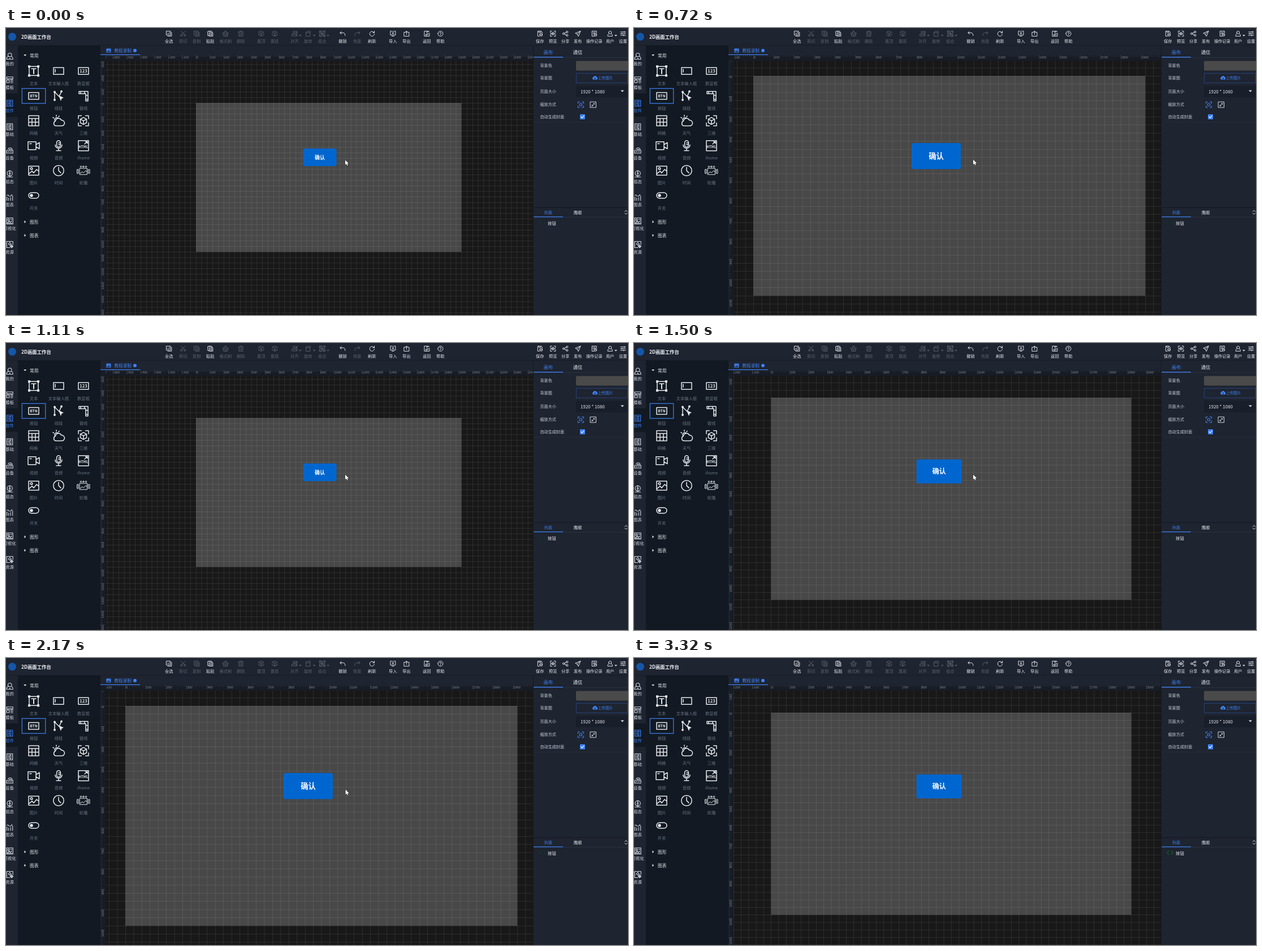
Recreate the animation shown at these times as an HTML page with a canvas. Size 1100 by 509 pixels, loop 3720 ms.

```html
<!DOCTYPE html>
<html lang="zh">
<head>
<meta charset="utf-8">
<title>2D画面工作台</title>
<style>
html, body { margin: 0; width: 100%; height: 100%; overflow: hidden; background: #1e2430; }
canvas { display: block; width: 1100px; height: 509px; }
</style>
</head>
<body>
<canvas id="stage" width="1100" height="509"></canvas>
<script>
const W = 1100, H = 509, LOOP = 3720;
const FONT = '"Noto Sans CJK SC", "Noto Sans CJK", "Noto Sans", sans-serif';
const RULE_FONT = '"Liberation Sans", sans-serif';
const BLUE = '#3f82f7', WHITE = '#e6eaf0', DIM = '#5b616c', BAR = '#1e2430', DARK = '#121922';
const view = document.getElementById('stage').getContext('2d');
const uiCanvas = document.createElement('canvas');
uiCanvas.width = W;
uiCanvas.height = H;
const ui = uiCanvas.getContext('2d');

// Path pieces
const O = (x, y, r) => `M${x - r} ${y}a${r} ${r} 0 1 0 ${2 * r} 0a${r} ${r} 0 1 0 ${-2 * r} 0z`;
const R = (x, y, w, h) => `M${x} ${y}h${w}v${h}h${-w}z`;
const CORNERS = s => [[-1, -1], [1, -1], [1, 1], [-1, 1]]
  .map(([a, b]) => `M${a * s} ${b * s * .4}V${b * s}H${a * s * .4}`).join('');

function box(g, x, y, w, h, color) {
  g.fillStyle = color;
  g.fillRect(x, y, w, h);
}

function text(g, s, x, y, size, color, align = 'center', weight = 400, family = FONT) {
  g.font = `${weight} ${size}px ${family}`;
  g.textAlign = align;
  g.textBaseline = 'middle';
  g.fillStyle = color;
  g.fillText(s, x, y);
}

function icon(x, y, line, color, width = 1, solid = '') {
  ui.save();
  ui.translate(x, y);
  ui.lineWidth = width;
  ui.lineJoin = ui.lineCap = 'round';
  ui.strokeStyle = ui.fillStyle = color;
  if (line) ui.stroke(new Path2D(line));
  if (solid) ui.fill(new Path2D(solid));
  ui.restore();
}

const caret = (x, y, color, s = 2.4) =>
  icon(x, y, '', color, 1, `M${-s} ${-s / 2}H${s}L0 ${s / 2}Z`);

function toolbar() {
  const stack = 'M0-4.5L4.5-2.5L0-.5L-4.5-2.5ZM-4.5 0V2.5L0 4.5L4.5 2.5V0';
  const sheet = 'M4-1V-4.5H-4V4.5H0M-2-2H2M-2 0H1';
  const tools = [
    [288, '全选', R(-4.5, -4.5, 7, 7) + 'M-2.5 4.5H4.5V-2.5M-3-1L-1.2.6L1.2-2.4', 1],
    [313, '剪切', 'M-4-4.5L3 2M4-4.5L-3 2' + O(-3, 3, 1.5) + O(3, 3, 1.5), 0],
    [337, '复制', R(-4.5, -4.5, 7, 7) + 'M-2.5 4.5H4.5V-2.5M-3-1H1M-1-3V1', 0],
    [361, '粘贴', 'M-2 3.5H-4.5V-4H3V-2M-2.5-4.5H1' + R(-1.5, -1.5, 6, 6) + 'M0 .8H3M0 2.6H3', 1],
    [388, '格式刷', 'M-1.2-1.5V-4.5H1.2V-1.5H4.5V1H-4.5V-1.5ZM-3.5 1V4.5H3.5V1M0 2V4.5', 0],
    [415, '删除', 'M-4.5-3H4.5M-1.5-4.6H1.5M-3.5-3V4.5H3.5V-3M-1.2-.8V2.5M1.2-.8V2.5', 0],
    [451, '置顶', stack + 'M0 3.5V0M-1.5 1.5L0 0L1.5 1.5', 0],
    [475, '置底', stack + 'M0 0V3.5M-1.5 2L0 3.5L1.5 2', 0],
    [510, '对齐', 'M4.5-4.5V4.5' + R(-2, -4, 5, 3) + R(-4.5, 1, 7.5, 3), 0, 520.5],
    [534, '旋转', R(-3.5, -1.5, 7, 6) + 'M-4.5-2A5 4 0 0 1 3-3.6L4.5-2M3-3.6L4-5', 0, 545],
    [559, '组合', R(-4, -4, 8, 8) + R(-2.2, -2.2, 3, 3) + R(-.5, -.5, 2.8, 2.8) + CORNERS(5), 0, 569.5],
    [595, '撤销', 'M-2-4L-4.5-1.5L-2 1M-4.5-1.5H1C3.5-1.5 4.5 1 4.5 3.5', 1],
    [621, '恢复', 'M2-4L4.5-1.5L2 1M4.5-1.5H-1C-3.5-1.5-4.5 1-4.5 3.5', 0],
    [647, '刷新', 'M3.7-1.8A4.2 4.2 0 1 0 4.2.8M4.2-4.5V-1.6H1.4', 1],
    [684, '导入', 'M-2-4.5H-4.5V2.5H4.5V-4.5H2M0-4.5V.5M-1.8-1.2L0 .6L1.8-1.2M-2 4.5H2', 1],
    [708, '导出', 'M-1.5-2.5H-4.5V4.5H4.5V-2.5H1.5M0 1.5V-4.5M-1.8-2.8L0-4.6L1.8-2.8', 1],
    [744, '返回', 'M0-4.5H-4.5V4.5H4.5V-1M3-4H0V-1M0-4L4-4M-2 2H2V-1M-2 2L-.5.5M-2 2L-.5 3.5', 1],
    [768, '帮助', O(0, 0, 4.5) + 'M-1.5-1.2A1.5 1.5 0 1 1 0 .6V1.2M0 2.6V2.7', 1],
    [944, '保存', 'M4-1V-2.5L2-4.5H-4V4.5H-1M-2-4.5V-2H1.5V-4.5' + O(2, 2, 2.4) + 'M1 2L2 3L3.2 1.3', 1],
    [967, '预览', CORNERS(4.6) + 'M-4 0Q0-4.2 4 0Q0 4.2-4 0Z' + O(0, 0, 1.2), 1],
    [989, '分享', O(-3, 0, 1.6) + O(3, -3, 1.6) + O(3, 3, 1.6) + 'M-1.5-.8L1.5-2.3M-1.5.8L1.5 2.3', 1],
    [1011, '发布', 'M4.5-4.5L-4.5-.8L-1 1L.8 4.5ZM-1 1L4.5-4.5', 1],
    [1040, '操作记录', sheet + O(2.2, 2.2, 2.3) + 'M2.2 1V2.3H3.2', 1],
    [1068, '用户', O(0, -2, 2.5) + 'M-2 0C-4 1-4.2 2.5-4.2 4.5H4.2C4.2 2.5 4 1 2 0', 1, 1078.5],
    [1091, '设置', 'M-4.5-3H4.5M-4.5 0H4.5M-4.5 3H4.5M2-4V-2M-2-1V1M1 2V4', 1]
  ];
  for (const [x, name, path, on, arrow] of tools) {
    const color = on ? WHITE : DIM;
    icon(x + .3, 10, path, color, .95);
    text(ui, name, x + .3, 23.6, 7.2, color);
    if (arrow) caret(arrow, 13.5, color);
  }
  ui.fillStyle = '#1556a8';
  ui.beginPath();
  ui.arc(11, 15.5, 7, 0, 7);
  ui.fill();
  text(ui, '2D画面工作台', 27, 15.7, 8.4, '#f0f3f8', 'left', 700);
}

function rail() {
  const list = R(-5, -5.5, 10, 11) + 'M-3-3H3M-3 0H3M-3 3H3M1-4V-2M-1-1V1M1 2V4';
  const items = [
    ['我的', O(0, -2.2, 3.3) + 'M-2.5 0C-5 1-5.5 3-5.5 5.5H-1M2.5 0C5 1 5.5 3 5.5 5.5H1L0 3.5L-1 5.5'],
    ['模板', R(-5.5, -5, 11, 3.4) + R(-5.5, .4, 4.5, 4.8) + 'M1.5.4H5.5M1.5 2.8H5.5M1.5 5.2H5.5'],
    ['控件', list],
    ['基础', list],
    ['设备', R(-5.5, 0, 11, 5) + 'M-3 2.5H-1M1 2.5H3M-3-2.5A4 4 0 0 1 4-2.5M-1.2-1A2 2 0 0 1 2.2-1M4-3V0'],
    ['组态', O(0, -1, 4.6) + O(0, -1, 1.2) + 'M0-5.5V-3M0 1V5.5M-5 5.5H5'],
    ['图表', 'M-5-1V5.5M-2 1V5.5M1.5 0V5.5M5-3V5.5M-5-4A3 3 0 0 1-1-2M1-2L4-5'],
    ['可视化', R(-5.5, -5.5, 11, 11) + O(-2, -2, 1.6) + 'M-4 3.5L-1 .5L1 2.5L3.5 0M1.5-3H4M-4 4H4'],
    ['资源', 'M5.5 0V-5.5H-5.5V5.5H0M-2.5-1L0-4L2.5-1L0 1Z' + O(3.2, 3.2, 2) + 'M3.2.5V6M.5 3.2H6']
  ];
  box(ui, 0, 116, 21, 41.5, DARK);
  items.forEach(([name, path], i) => {
    const y = 50 + i * 41.75, color = i === 2 ? BLUE : '#d5dae3';
    icon(6.7, y, path, color, 1.1);
    text(ui, name, 6.5, y + 13.1, 7.4, color);
  });
}

function palette() {
  const frame = R(-9, -6, 18, 12);
  const square = R(-9, -9, 18, 18);
  const cells = [
    ['文本', R(-8, -8, 16, 16) + 'M-4-4H4M0-4V5', R(-10, -10, 4, 4) + R(6, -10, 4, 4) + R(-10, 6, 4, 4) + R(6, 6, 4, 4) + R(-1, -4, 2, 9)],
    ['文本输入框', frame + 'M-6-3V2'],
    ['数显框', frame, '', '123', 7.5],
    ['按钮', frame, '', 'BTN', 6.6],
    ['线段', 'M-7 7V-7L1 1L5-8', O(-7, -7, 2) + O(-7, 7, 2) + O(5, -8, 2) + 'M0-1L9 3L5.4 4.7L4 9Z'],
    ['管线', 'M-8-8H8V9H4V-4H-8ZM-5-8V-4M2-8V-4M4-1H8M4 6H8'],
    ['网格', square + 'M-9-4H9M-9 2.5H9M-3-4V9M3-4V9'],
    ['天气', 'M-5 9a4.5 4.5 0 0 1-.5-8.6a5.5 5.5 0 0 1 10.5-1.4a5 5 0 0 1 1 10zM-7-1a4 4 0 0 1 6-4M-4-10V-8M-10-6L-8.4-5M1-8.5L0-7'],
    ['三维', CORNERS(9) + 'M0-6L5.5-3V3.4L0 6.5L-5.5 3.4V-3ZM-5.5-3L0 0L5.5-3M0 0V6.5'],
    ['视频', R(-10, -7, 14, 14) + 'M4-2L10-5.5V5.5L4 2M-7-3.5H-4'],
    ['音频', 'M-3.4-5.5a3.4 3.4 0 0 1 6.8 0v4.5a3.4 3.4 0 0 1-6.8 0zM-6-1.5a6 6 0 0 0 12 0M0 4.7V8.8M-4 8.8H4M0-5H3M0-2H3'],
    ['iframe', square + 'M2-3L7-7M3.5-7H7V-4', '', 'HTML', 6],
    ['图片', R(-9, -8, 18, 16) + O(-4, -3.5, 1.8) + 'M-9 6L-3 1L0 4L5-2L9 1'],
    ['时间', O(0, 0, 9.2) + 'M0-6V0L4 4'],
    ['轮播', R(-6.5, -4, 13, 11) + R(-11, -2, 2, 7) + R(9, -2, 2, 7) + 'M-6 5L-2 2L0 4L4 0L6 2' + O(-4.5, -7, 1.2) + O(0, -7, 1.2) + O(4.5, -7, 1.2)],
    ['开关', 'M-4-5H4a5 5 0 0 1 0 10H-4a5 5 0 0 1 0-10z', O(-4, 0, 2.8)]
  ];
  const head = (name, y, open) => {
    icon(33.7, y, '', WHITE, 1, open ? 'M-2.6-1.3H2.6L0 1.5Z' : 'M-1.2-2.5L1.5 0L-1.2 2.5Z');
    text(ui, name, 42, y + .3, 7.8, WHITE, 'left', 500);
  };
  head('常用', 48.3, true);
  head('图形', 343.7);
  head('图表', 367.7);
  cells.forEach(([name, line, solid, word, size], i) => {
    const x = 49 + i % 3 * 44, y = 76.3 + Math.floor(i / 3) * 44.15;
    icon(x, y, line, WHITE, name === '轮播' ? 1 : 1.5, solid);
    if (word) text(ui, word, x, y + (word === 'HTML' ? 1.5 : .2), size, WHITE, 'center', 700);
    text(ui, name, x, y + 21.7, 7.3, '#687382');
  });
  ui.strokeStyle = BLUE;
  ui.lineWidth = 1.2;
  ui.strokeRect(28.3, 107.3, 41.5, 26.4);
}

function side() {
  const label = (s, y) => text(ui, s, 944.5, y, 7.1, '#cbd1db', 'left');
  text(ui, '画布', 959, 42.5, 8.3, BLUE);
  text(ui, '通信', 1011, 42.5, 8.3, WHITE);
  box(ui, 933, 52, 167, .6, '#303744');
  box(ui, 933, 51, 52, 1.3, BLUE);

  label('背景色', 66.5);
  ui.fillStyle = '#4a4a4a';
  ui.beginPath();
  ui.roundRect(1008, 58.5, 93, 17, 2);
  ui.fill();

  label('背景图', 88.3);
  ui.strokeStyle = '#2a519c';
  ui.lineWidth = .7;
  ui.strokeRect(1008.3, 80.2, 91.2, 17);
  icon(1041.7, 88.6, '', BLUE, 1, 'M-3 3a2.4 2.4 0 0 1 0-4.5a3.2 3.2 0 0 1 6 0a2.4 2.4 0 0 1 0 4.5z');
  icon(1041.7, 89, 'M0 2.5V-.6M-1.2.5L0-.7L1.2.5', BAR, .8);
  text(ui, '上传图片', 1046.7, 88.5, 6.6, BLUE, 'left');

  label('页面大小', 112);
  box(ui, 1008, 102, 92, 21, '#191f2a');
  text(ui, '1920 * 1080', 1016, 112.6, 8, WHITE, 'left');
  caret(1090, 112, WHITE, 3);

  label('缩放方式', 135.7);
  icon(1016.5, 136, CORNERS(5) + R(-2, -2, 4, 4), BLUE, 1.1);
  icon(1038.5, 136, R(-5, -5, 10, 10) + 'M3-3L.8-.8M.8-2.5V-.8H2.5M-3 3L-.8.8M-.8 2.5V.8H-2.5', WHITE, .9);

  label('自动生成封面', 157.3);
  ui.fillStyle = BLUE;
  ui.beginPath();
  ui.roundRect(1015, 153, 9, 9, 1);
  ui.fill();
  icon(1019.5, 157.5, 'M-2.5 0L-.7 1.8L2.7-1.8', '#fff', 1.1);
  box(ui, 933, 166.6, 167, .7, '#2a303c');

  box(ui, 933, 318, 167, 1, '#131821');
  text(ui, '列表', 959, 327.3, 7.3, BLUE);
  text(ui, '鹰眼', 1011, 327.3, 7.3, WHITE);
  box(ui, 933, 335, 167, .7, '#303744');
  box(ui, 933, 334.3, 52, 1.2, BLUE);
  icon(1096.5, 327, 'M-2-1.5L0-3.5L2-1.5M-2 1.5L0 3.5L2 1.5', WHITE, 1);
  text(ui, '按钮', 958, 345.7, 7.4, WHITE, 'left');
}

function buildUi() {
  box(ui, 0, 0, W, H, BAR);
  box(ui, 21, 31, 146, H - 31, DARK);
  box(ui, 0, 30.5, W, .8, '#161b24');
  box(ui, 932, 31, 1, H - 31, '#141922');
  toolbar();
  rail();
  palette();
  side();
  icon(181.5, 40, '', BLUE, 1, 'M-4-3.5H4V3.5H-4Z');
  icon(181.5, 40, '', BAR, 1, 'M-3 2.4L-1-.5L.5 1.2L1.6 0L3 2.4Z' + O(1.5, -1.6, .7));
  text(ui, '教程录制', 191.5, 40.2, 7.6, BLUE, 'left');
  icon(228, 40, '', BLUE, 1, O(0, 0, 3));
  box(ui, 167, 46.8, 70, 1.2, BLUE);
}

// Zoom notches around a fixed point, and pointer stops: each holds until the next
const ZOOM = [[0, 0], [440, 3], [600, 5], [720, 4], [990, 2], [1110, 0], [1500, 3], [1620, 5], [2170, 4], [2290, 3]];
const POINTER = [[0, 599.8, 234], [600, 599.8, 233.3], [2030, 600.4, 233.3], [2700, 691.3, 294.5],
  [2840, 772, 352], [2960, 850, 404], [3080, 912, 452], [3200, 950, 497], [3320, -50, -50]];
const at = (track, t) => track.filter(k => k[0] <= t).pop();

function clip(x, y, w, h, draw) {
  view.save();
  view.beginPath();
  view.rect(x, y, w, h);
  view.clip();
  draw();
  view.restore();
}

function workspace(notch) {
  const s = .2445 + .0291 * notch;
  const x0 = 598.1 - 1072 * s, y0 = 233.7 - 412 * s;

  clip(176, 58, 756, 451, () => {
    box(view, 176, 58, 756, 451, '#181818');
    box(view, x0, y0, 1920 * s, 1080 * s, '#484848');
    const cell = 40 * s, line = 'rgba(255,255,255,.15)', thin = .6;
    for (let x = 176 + (x0 - 176) % cell; x < 932; x += cell) box(view, x, 58, thin, 451, line);
    for (let y = 58 + (y0 - 58) % cell; y < H; y += cell) box(view, 176, y, 756, thin, line);

    view.fillStyle = '#0066cf';
    view.beginPath();
    view.roundRect(x0 + 775 * s, y0 + 330 * s, 241 * s, 128 * s, 10 * s);
    view.fill();
    text(view, '确认', x0 + 895.5 * s, y0 + 394 * s, 36.5 * s, '#fff', 'center', 700);
  });

  const rule = '#171c25', major = '#666b74', minor = '#3b414b', ink = '#868b94';
  const step = 10 * s;
  box(view, 167, 48, 765, 10, rule);
  box(view, 167, 48, 9, 461, rule);
  clip(176, 48, 756, 10, () => {
    for (let i = Math.floor((140 - x0) / step); x0 + i * step < 932; i++) {
      const x = x0 + i * step, big = i % 10 === 0;
      box(view, x, 48, .6, big ? 6.9 : 3, big ? major : minor);
      if (big) text(view, String(i * 10), x + 1, 52.7, 5.4, ink, 'left', 400, RULE_FONT);
    }
  });
  clip(167, 58, 9, 451, () => {
    for (let i = Math.floor((20 - y0) / step); y0 + i * step < H; i++) {
      const y = y0 + i * step, big = i % 10 === 0;
      box(view, 167, y, big ? 6.9 : 3, .6, big ? major : minor);
      if (!big) continue;
      view.save();
      view.translate(172, y + 1);
      view.rotate(-Math.PI / 2);
      text(view, String(i * 10), 0, 0, 5.4, ink, 'right', 400, RULE_FONT);
      view.restore();
    }
  });
}

const ARROW = new Path2D('M0 0V9L2.1 7.1L3.5 10.3L5 9.6L3.6 6.6H6.4Z');
function pointer(x, y) {
  view.save();
  view.translate(x, y);
  view.lineWidth = .8;
  view.strokeStyle = '#000';
  view.fillStyle = '#fff';
  view.stroke(ARROW);
  view.fill(ARROW);
  view.restore();
}

function codeMark(color) {
  view.strokeStyle = color;
  view.lineWidth = 1.1;
  view.stroke(new Path2D('M946 341.8L942.8 345.2L946 348.6M950 341.8L953.2 345.2L950 348.6'));
}

function draw(now) {
  const t = now % LOOP;
  view.drawImage(uiCanvas, 0, 0);
  workspace(at(ZOOM, t)[1]);
  codeMark(t < 3320 ? '#14382a' : '#0d6a22');
  const [, x, y] = at(POINTER, t);
  pointer(x, y);
}

buildUi();
const start = performance.now();
function tick() {
  draw(performance.now() - start);
  requestAnimationFrame(tick);
}
tick();
</script>
</body>
</html>
```
